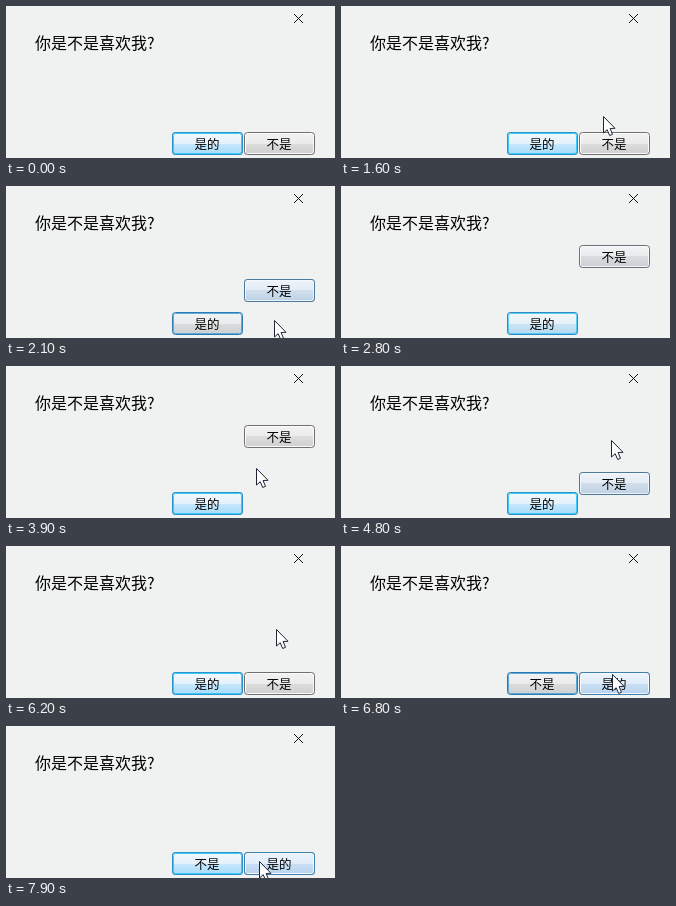
Recreate the animation shown at these times as an HTML page with a canvas. Size 329x152 px, loop 8 s.

```html
<!DOCTYPE html>
<html lang="zh-CN">
<head>
<meta charset="utf-8">
<style>
  html, body { margin: 0; width: 100%; height: 100%; overflow: hidden; background: #f0f2f1; }
  canvas { display: block; }
</style>
</head>
<body>
<canvas id="stage" width="329" height="152"></canvas>
<script>
const ctx = document.getElementById('stage').getContext('2d');
const FONT = '"Noto Sans CJK SC", "Noto Sans CJK", "Noto Sans CJK JP", sans-serif';
const LOOP = 8000, STEP = 100;
const FLEE = 1770, RETURN = 4330, TRAVEL = 670, SWAP = 6700;

// Fill: top and bottom colour of the upper half, then of the lower half
const GREY = ['#f2f2f2', '#ebebeb', '#dddddd', '#cfcfcf'];
const NORMAL = { border: '#707070', rim: '#fbfbfb', fill: GREY };
const HOT = { border: '#3c7fb1', rim: '#f6fafe', fill: ['#ecf4fc', '#dfecf9', '#c9dff4', '#b8d3ee'] };
const DIM = { border: '#2c78b0', rim: '#5aa6d8', fill: GREY };
const GLOW = { border: '#2a94cc', rim: '#3cc8f8', fill: ['#f2f8fc', '#e4f2fb', '#c8e8fb', '#a8dcfb'] };

// Each stroke of the mouse is a quadratic curve: from, bend, to
const strokes = [
  { start: 900, end: 1700, path: [[297, 53], [232, 92], [270, 116]] },
  { start: 1700, end: 2300, path: [[270, 116], [268, 117], [268, 156]] },
  { start: 3300, end: 3900, path: [[201, 149], [318, 156], [250, 102]] },
  { start: 4100, end: 4500, path: [[250, 102], [262, 82], [270, 74]] },
  { start: 6100, end: 7000, path: [[270, 74], [270, 118], [271, 138]] },
  { start: 7700, end: 7900, path: [[271, 138], [262, 137], [253, 135]] }
];

const ramp = (t, start, length) => Math.min(1, Math.max(0, (t - start) / length));
const flash = (t, start, length) => t < start ? 0 : 1 - ramp(t, start, length);

function cursorAt(t) {
  const stroke = strokes.findLast(s => s.start <= t);
  if (!stroke) return null;
  const p = ramp(t, stroke.start, stroke.end - stroke.start), q = 1 - p;
  const [from, bend, to] = stroke.path;
  return [0, 1].map(i => Math.round(q * q * from[i] + 2 * p * q * bend[i] + p * p * to[i]));
}

function outlineRect(x, y, w, h, r, color) {
  ctx.beginPath();
  ctx.roundRect(x, y, w, h, r);
  ctx.strokeStyle = color;
  ctx.stroke();
}

function face(x, y, skin, alpha) {
  ctx.globalAlpha = alpha;
  const gradient = ctx.createLinearGradient(0, y + 1, 0, y + 22);
  skin.fill.forEach((color, i) => gradient.addColorStop([0, 0.5, 0.5, 1][i], color));
  ctx.fillStyle = gradient;
  ctx.fillRect(x + 1, y + 1, 69, 21);
  outlineRect(x + 1.5, y + 1.5, 68, 20, 2, skin.rim);
  outlineRect(x + 0.5, y + 0.5, 70, 22, 3, skin.border);
  ctx.globalAlpha = 1;
}

function text(label, x, y, size, align) {
  ctx.font = `${size}px ${FONT}`;
  ctx.textAlign = align;
  ctx.fillStyle = '#000';
  ctx.fillText(label, x, y);
}

function button(x, y, label, base, overlay, alpha) {
  face(x, y, base, 1);
  face(x, y, overlay, alpha);
  text(label, x + 35, y + 17, 12.5, 'center');
}

function closeIcon() {
  ctx.strokeStyle = '#111';
  ctx.beginPath();
  ctx.moveTo(288, 8);
  ctx.lineTo(297, 17);
  ctx.moveTo(297, 8);
  ctx.lineTo(288, 17);
  ctx.stroke();
}

function cursor(x, y) {
  const outline = [[0, 0], [0, 16.5], [3.7, 13.2], [6.2, 19], [9, 17.8], [6.6, 12], [11.5, 11.8]];
  ctx.beginPath();
  outline.forEach(([dx, dy]) => ctx.lineTo(x + dx + 0.5, y + dy + 0.5));
  ctx.closePath();
  ctx.fillStyle = '#fff';
  ctx.fill();
  ctx.strokeStyle = '#1f2336';
  ctx.stroke();
}

function draw(t) {
  ctx.fillStyle = '#f0f2f1';
  ctx.fillRect(0, 0, 329, 152);
  closeIcon();
  text('你是不是喜欢我?', 29, 43, 16, 'left');

  const swapped = t >= SWAP;
  const [left, right] = swapped ? ['不是', '是的'] : ['是的', '不是'];
  const glow = (1 - flash(t, FLEE, 1200)) ** 2 * (1 - flash(t, SWAP, 700)) ** 2;
  const hover = swapped ? 1 : flash(t, FLEE, 1200) + flash(t, RETURN, 1200);
  const lift = ramp(t, FLEE, TRAVEL) - ramp(t, RETURN, TRAVEL);
  button(166, 126, left, DIM, GLOW, glow);
  button(238, Math.round(126 - 67 * lift), right, NORMAL, HOT, hover);

  const tip = cursorAt(t);
  if (tip) cursor(...tip);
}

function tick() {
  const t = performance.now() % LOOP;
  draw(Math.floor(t / STEP) * STEP);
  requestAnimationFrame(tick);
}
tick();
</script>
</body>
</html>
```
